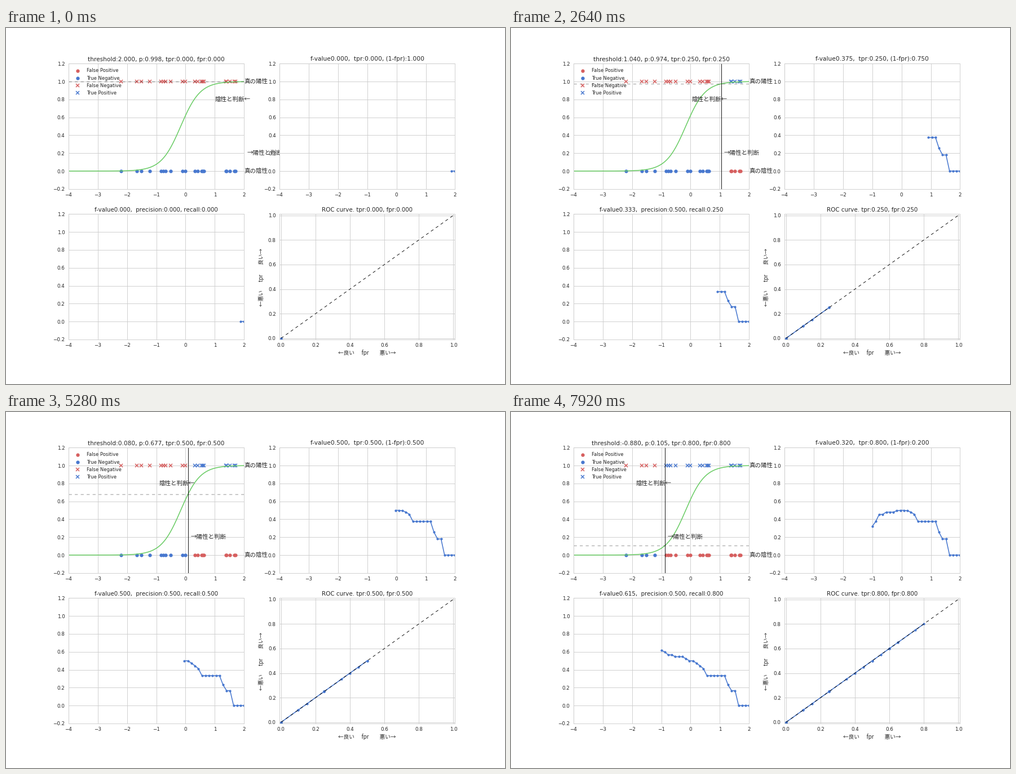
Animation, 885 px wide and 632 px high, one loop 8 s. Source, as a matplotlib script:

```python
import numpy as np
import matplotlib.pyplot as plt
from matplotlib.animation import FuncAnimation

W, H = 885, 632
TICK = 80            # ms per drawn frame
HOLD = 330           # ms each threshold stays
LOOP = 8000

BLUE, RED, GREEN = "#4878CF", "#D65F5F", "#6ACC65"
INK, GRID = "0.15", "0.8"
JP = "Noto Sans CJK JP"

plt.rcParams.update({
    "font.family": "DejaVu Sans",
    "text.color": INK,
    "axes.edgecolor": GRID,
    "axes.linewidth": 0.88,
    "axes.axisbelow": True,
    "grid.color": GRID,
    "grid.linewidth": 0.88,
    "lines.linewidth": 1.54,
    "lines.scale_dashes": False,
})

DATA = np.array([-2.21, -1.67, -1.51, -1.23, -0.83, -0.75, -0.69, -0.50,
                 -0.10, 0.0, 0.31, 0.41, 0.54, 0.59, 0.62,
                 1.38, 1.39, 1.51, 1.67, 1.71])
STEPS = LOOP // HOLD + 1
DELTA = 0.12
DASH = (0, (5.27, 5.27))


def sigmoid(x):
    return 1 / (1 + np.exp(-(3 * x + 0.5)))


def harmonic(a, b):
    total = a + b
    return 2 * a * b / total if a > 0 and total > 0 else 0.0


# Both classes share the same x values, so tpr equals fpr everywhere.
thresholds = 2 - DELTA * np.arange(STEPS)
rates = np.array([(DATA > t).mean() for t in thresholds])
precisions = np.where(rates > 0, 0.5, 0.0)
balance = np.array([harmonic(r, 1 - r) for r in rates])
f_values = np.array([harmonic(p, r) for p, r in zip(precisions, rates)])

fig, axes = plt.subplots(2, 2, figsize=(W / 72, H / 72), dpi=72)
fig.subplots_adjust(left=0.125, right=0.9, bottom=0.125, top=0.9,
                    wspace=0.2, hspace=0.2)
(ax_fit, ax_bal), (ax_f, ax_roc) = axes


def style(ax, xlim, ylim, xticks, yticks):
    ax.set_xlim(*xlim)
    ax.set_ylim(*ylim)
    ax.set_xticks(xticks)
    ax.set_yticks(yticks)
    ax.grid(True)
    ax.tick_params(length=0, pad=6.1, labelsize=8.78, labelcolor=INK)


for ax in (ax_fit, ax_bal, ax_f):
    style(ax, (-4, 2), (-0.2, 1.2), np.arange(-4, 3),
          np.linspace(-0.2, 1.2, 8).round(1))
unit = np.linspace(0, 1, 6).round(1)
style(ax_roc, (-0.01, 1.01), (-0.01, 1.01), unit, unit)

# Classifier panel
xs = np.linspace(-4, 2, 200)
ax_fit.plot(xs, sigmoid(xs), color=GREEN)
level, = ax_fit.plot([], [], color="k", alpha=0.3, lw=1.4, ls=DASH)
cut, = ax_fit.plot([], [], color="0.05", lw=0.95)


def marks(marker, color):
    return ax_fit.plot([], [], ls="none", marker=marker, color=color,
                       ms=6.3, mew=1.5 if marker == "x" else 0,
                       zorder=1.5)[0]


false_pos, true_neg = marks("o", RED), marks("o", BLUE)
false_neg, true_pos = marks("x", RED), marks("x", BLUE)


def label(x, y, text):
    return ax_fit.text(x, y, text, family=JP, size=10.53, va="center")


label(2, 1, "真の陽性")
label(2, 0, "真の陰性")
neg_text = label(1, 0.8, "陰性と判断←")
pos_text = label(2.1, 0.2, "→陽性と判断")

legend = [("False Positive", "o", RED), ("True Negative", "o", BLUE),
          ("False Negative", "x", RED), ("True Positive", "x", BLUE)]
for i, (name, marker, color) in enumerate(legend):
    y = 75.7 + 13.15 * i
    ax_fit.plot([127.3 / W], [1 - y / H], transform=fig.transFigure,
                ls="none", marker=marker, color=color, ms=6.3,
                mew=1.5 if marker == "x" else 0, zorder=5)
    fig.text(143 / W, 1 - (y + 2.7) / H, name, size=8.4)

# Score panels
dots = dict(color=BLUE, marker="o", ms=4.2, mew=0)
bal_line, = ax_bal.plot([], [], **dots)
f_line, = ax_f.plot([], [], **dots)
roc_line, = ax_roc.plot([], [], **dots)
ax_roc.plot([0, 1], [0, 1], color="k", lw=0.9, ls=DASH)

axis_label = dict(family=JP, size=9.66, ha="center", va="center")
fig.text(640.6 / W, 1 - 577 / H,
         "←良い" + " " * 6 + "fpr" + " " * 9 + "悪い→", **axis_label)
fig.text(453 / W, 1 - 442 / H,
         "←悪い" + " " * 7 + "tpr" + " " * 8 + "良い→",
         rotation=90, **axis_label)


def title(ax, size, pad=4.4):
    return ax.set_title(" ", fontsize=size, pad=pad)


fit_title = title(ax_fit, 10.48)
bal_title = title(ax_bal, 10.58, 5.2)
f_title = title(ax_f, 10.27)
roc_title = title(ax_roc, 10.28)


def update(i):
    k = min((i * TICK + TICK - 1) // HOLD, STEPS - 1)
    t, r = thresholds[k], rates[k]
    p = sigmoid(t)

    level.set_data([-4, 2], [p, p])
    cut.set_data([t, t], [-0.2, 1.2])
    above, below = DATA[DATA > t], DATA[DATA <= t]
    for line, pts, y in ((false_pos, above, 0), (true_neg, below, 0),
                         (false_neg, below, 1), (true_pos, above, 1)):
        line.set_data(pts, np.full(len(pts), y))
    neg_text.set_x(t - 1)
    pos_text.set_x(t + 0.1)

    # The first value is recorded twice, so curves run one step ahead.
    order = np.r_[0, 0:k + 1]
    x = 2 - DELTA * np.arange(k + 2)
    bal_line.set_data(x, balance[order])
    f_line.set_data(x, f_values[order])
    roc_line.set_data(rates[order], rates[order])

    fit_title.set_text(
        f"threshold:{t:.3f}, p:{p:.3f}, tpr:{r:.3f}, fpr:{r:.3f}")
    bal_title.set_text(
        f"f-value{balance[k]:.3f},  tpr:{r:.3f}, (1-fpr):{1 - r:.3f}")
    f_title.set_text(f"f-value{f_values[k]:.3f},  "
                     f"precision:{precisions[k]:.3f}, recall:{r:.3f}")
    roc_title.set_text(f"ROC curve. tpr:{r:.3f}, fpr:{r:.3f}")
    return []


anim = FuncAnimation(fig, update, frames=LOOP // TICK, interval=TICK,
                     init_func=lambda: update(0), repeat=True, repeat_delay=0)
plt.show()
```
